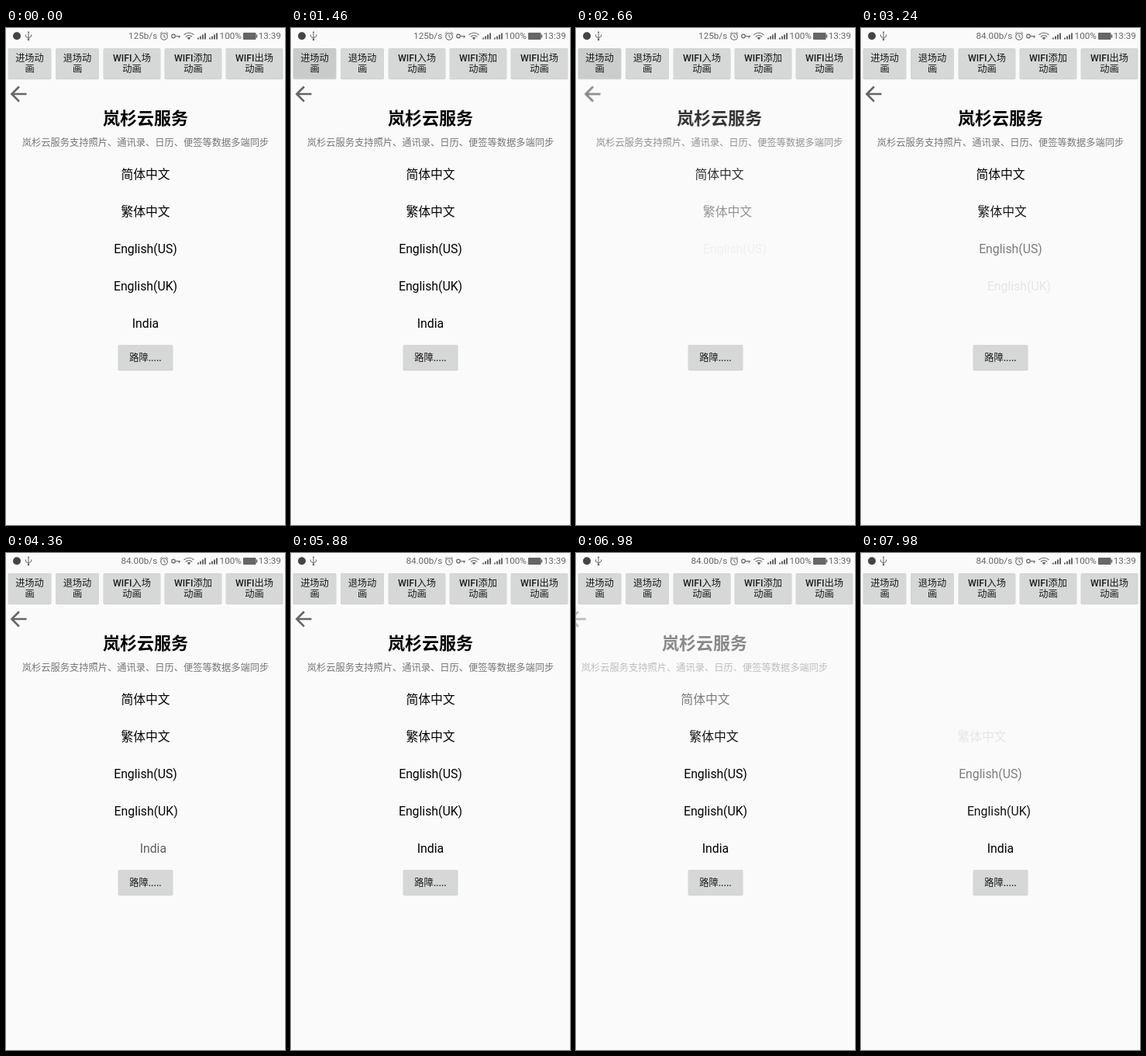
Write an HTML page that moves like this. It is 360 px wide and 640 px high and loops after 8000 ms.

```html
<!DOCTYPE html>
<html lang="zh-CN">
<head>
<meta charset="utf-8">
<title>进场与退场动画</title>
<style>
html, body { margin: 0; width: 100%; height: 100%; overflow: hidden; background: #fafafa; }
svg { display: block; width: 360px; height: 640px; }
text { font-family: Roboto, "Noto Sans CJK SC", "Noto Sans CJK", sans-serif; text-anchor: middle; fill: #000; }
.status text { font-size: 11.7px; fill: #666; text-anchor: start; }
.button text { font-size: 12.25px; font-weight: 500; fill: #1b1b1b; }
.title { font-size: 22px; font-weight: 700; }
.sub { font-size: 12.25px; fill: #757575; }
.item { font-size: 15.8px; }
</style>
</head>
<body>
<svg viewBox="0 0 360 640">
  <g class="status" fill="#666">
    <circle cx="14" cy="10.3" r="5" fill="#444"/>
    <g fill="none" stroke="#666">
      <path d="M29 5V15M25.5 8.5V11L29 13L32.5 11V8.5"/>
      <circle cx="204" cy="11" r="4.3" stroke-width="1.1"/>
      <path d="M204 8.5V11.3L206 12.5M198.8 7.5L201.5 5.2M209.2 7.5L206.5 5.2"/>
      <circle cx="216" cy="10.5" r="2.3" stroke-width="1.2"/>
      <path d="M218.3 10.5H225M223.3 10.5V13" stroke-width="1.2"/>
      <path d="M229.5 8.8Q236 3.6 242.5 8.8M231.8 11.2Q236 7.8 240.2 11.2" stroke-width="1.1"/>
    </g>
    <path d="M27.8 6L29 4L30.2 6Z"/>
    <circle cx="29" cy="15" r="1.3"/>
    <path d="M233.6 12.6Q236 10.8 238.4 12.6L236 15.3Z"/>
    <g id="signal"></g>
    <rect x="306" y="6" width="16.5" height="9" rx="1"/>
    <rect x="322.5" y="8.5" width="1.8" height="4"/>
    <text id="speed" x="195.2" y="14.4" style="text-anchor:end"></text>
    <text x="275.6" y="14.4">100%</text>
    <text x="325.8" y="14.4">13:39</text>
  </g>
  <g id="buttons"></g>
  <g id="header">
    <path transform="translate(.3 69.3) scale(1.31)" fill="#666"
      d="M20 11H7.83l5.59-5.59L12 4l-8 8 8 8 1.41-1.41L7.83 13H20z"/>
    <text class="title" x="180" y="124.3">岚杉云服务</text>
    <text class="sub" x="180" y="151.7">岚杉云服务支持照片、通讯录、日历、便签等数据多端同步</text>
  </g>
  <g id="items"></g>
</svg>
<script>
const LOOP = 8000, SLIDE = 1560, SHIFT = 26;
const $ = id => document.getElementById(id);

function add(parent, tag, attrs, text) {
  const el = document.createElementNS('http://www.w3.org/2000/svg', tag);
  for (const key in attrs) el.setAttribute(key, attrs[key]);
  if (text) el.textContent = text;
  return parent.appendChild(el);
}

// Returns the overlay that darkens the button while it is pressed.
function addButton(x, y, w, h, lines) {
  const g = add($('buttons'), 'g', { class: 'button' });
  const box = { x, y, width: w, height: h, rx: 2 };
  add(g, 'rect', { ...box, x: x - .5, width: w + 1, height: h + 1.3, fill: '#000', opacity: .16 });
  add(g, 'rect', { ...box, fill: '#d6d7d7' });
  const shade = add(g, 'rect', { ...box, fill: '#000', opacity: 0 });
  const top = y + h / 2 + 4.5 - (lines.length - 1) * 7;
  lines.forEach((line, i) => add(g, 'text', { x: x + w / 2, y: top + i * 14 }, line));
  return shade;
}

for (const x of [247, 262])
  for (let i = 0; i < 4; i++) {
    const h = 2 + i * 2;
    add($('signal'), 'rect', { x: x + i * 3, y: 14.5 - h, width: 2, height: h });
  }

const enterKey = addButton(3, 26, 55, 39, ['进场动', '画']);
const exitKey = addButton(64.5, 26, 55, 39, ['退场动', '画']);
addButton(126, 26, 73, 39, ['WIFI入场', '动画']);
addButton(205, 26, 73, 39, ['WIFI添加', '动画']);
addButton(284, 26, 73, 39, ['WIFI出场', '动画']);
addButton(145, 408, 70, 32, ['路障.....']);

// Each part: element, start of its entrance, start of its exit.
const parts = [[$('header'), 1555, 6160]];
[
  ['简体中文', 1555, 6200],
  ['繁体中文', 1975, 6700],
  ['English(US)', 2460, 7200],
  ['English(UK)', 2960, 7700],
  ['India', 3460, 8200]
].forEach(([name, enter, exit], i) => {
  const el = add($('items'), 'text', { class: 'item', x: 180, y: 194 + i * 48 }, name);
  parts.push([el, enter, exit]);
});

const clamp = v => Math.min(1, Math.max(0, v));
const ramp = (t, from, to) => clamp((t - from) / (to - from));
const ease = u => (1 - Math.cos(Math.PI * u)) / 2;
const slide = (t, start) => ease(ramp(t, start, start + SLIDE));

function draw(t) {
  for (const [el, enter, exit] of parts) {
    const shown = t < parts[0][1] ? 1 : slide(t, enter);
    const gone = slide(t, exit);
    el.setAttribute('transform', `translate(${SHIFT * (1 - shown - gone)} 0)`);
    el.setAttribute('opacity', shown * (1 - gone));
  }
  enterKey.setAttribute('opacity', .08 * ramp(t, 1310, 1500) * (1 - ramp(t, 2400, 3100)));
  exitKey.setAttribute('opacity', .08 * ramp(t, 5900, 6080) * (1 - ramp(t, 6250, 6680)));
  $('speed').textContent = t < 3060 ? '125b/s' : '84.00b/s';
}

const begin = performance.now();
function tick() {
  draw((performance.now() - begin) % LOOP);
  requestAnimationFrame(tick);
}
tick();
</script>
</body>
</html>
```
